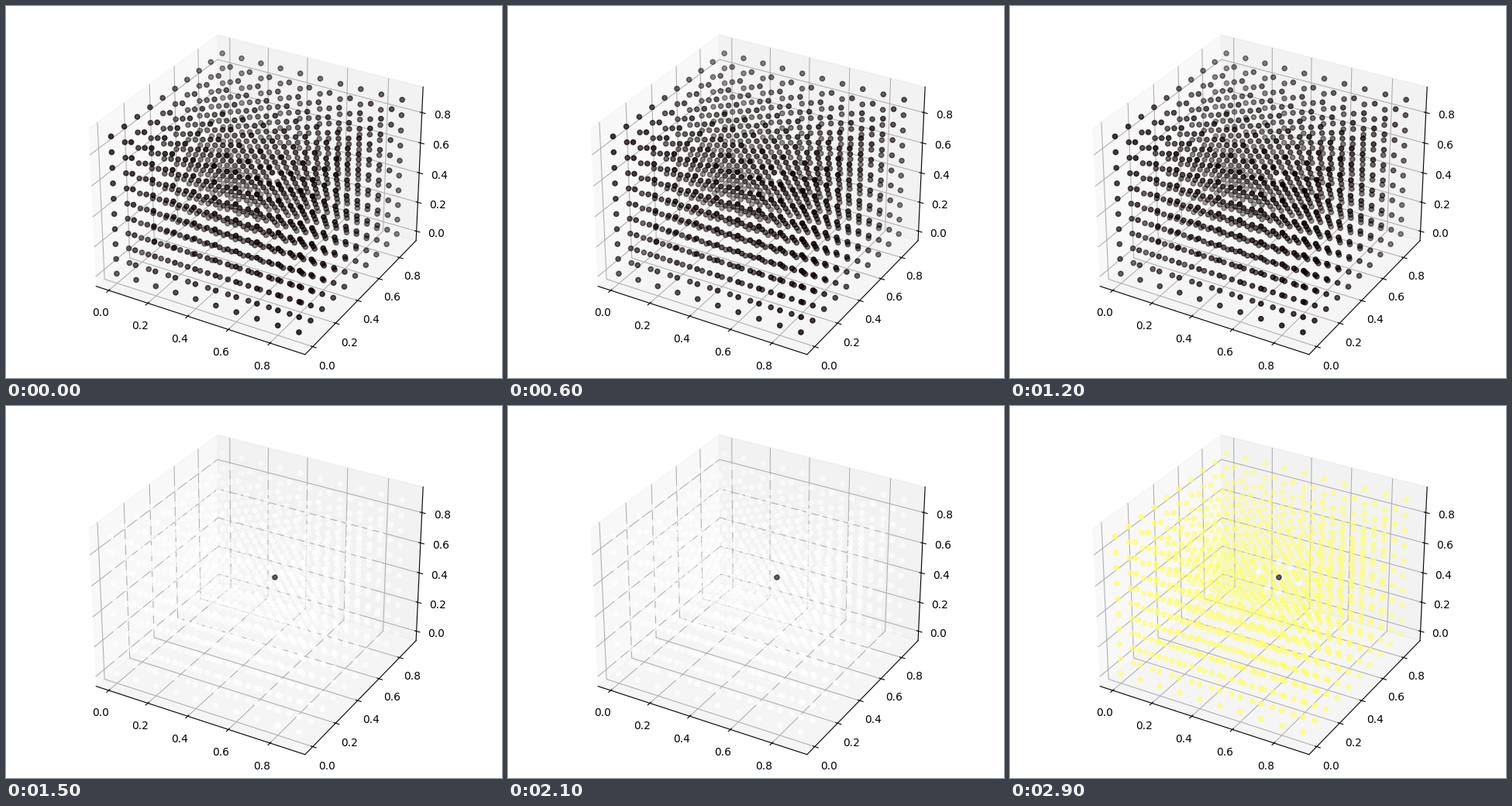
Write a matplotlib script that moves like this. It is 640x480 px and loops after 3000 ms.

```python
import numpy as np
import matplotlib.pyplot as plt
from matplotlib.animation import FuncAnimation

N = 10          # points per side
CENTRE = 5
FRAMES = 30
INTERVAL = 100  # ms


def laplacian(u):
    """Six-neighbour Laplacian on a periodic grid."""
    return sum(np.roll(u, s, axis) for axis in range(3) for s in (-1, 1)) - 6 * u


def rescale(u):
    return ((u - u.min()) / (u.max() - u.min())).ravel()


pulse = np.zeros((N, N, N))
pulse[CENTRE, CENTRE, CENTRE] = 1
spread = laplacian(pulse)

# Six-step oscillation: each extreme holds for two steps
cycle = [rescale(u) for u in (pulse, pulse, -spread, -pulse, -pulse, spread)]

fig = plt.figure(figsize=(6.4, 4.8), dpi=100)
ax = fig.add_axes([0, 0, 1, 1], projection="3d")

x, y, z = np.indices((N, N, N)) / N
points = ax.scatter(x.ravel(), y.ravel(), z.ravel(), c=cycle[0],
                    cmap="hot", vmin=0, vmax=1)


def update(frame):
    points.set_array(cycle[frame % len(cycle)])
    return (points,)


anim = FuncAnimation(fig, update, frames=FRAMES, interval=INTERVAL,
                     repeat=True, repeat_delay=0, blit=False)
plt.show()
```
